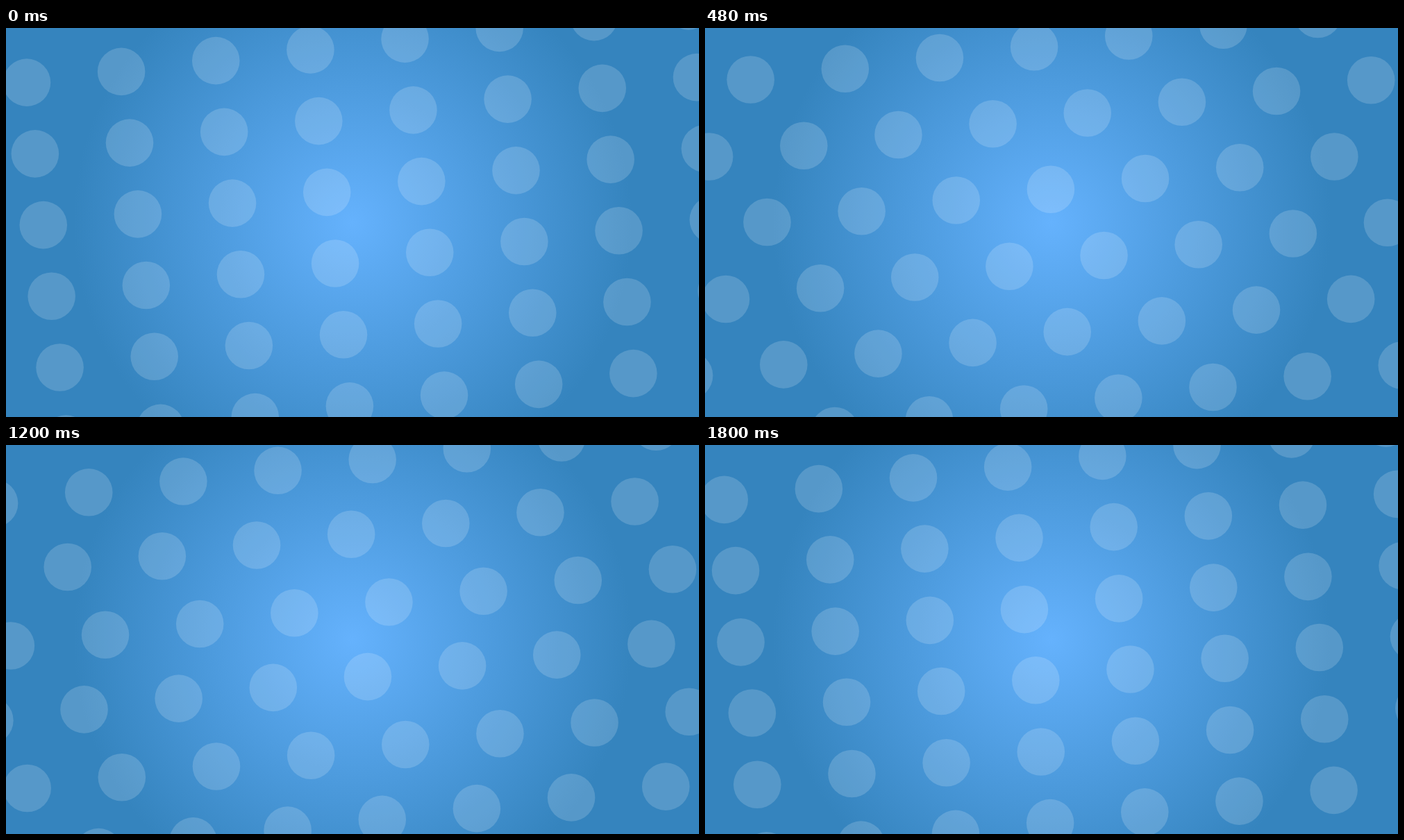
An HTML page with a canvas that plays this animation: 998 by 561 pixels, repeating every 1.83 s.

```html
<!DOCTYPE html>
<html lang="en">
<head>
<meta charset="utf-8">
<title>Drifting dots</title>
<style>
  html, body { margin: 0; width: 100%; height: 100%; overflow: hidden; }
  canvas { display: block; }
</style>
</head>
<body>
<canvas id="stage" width="998" height="561"></canvas>
<script>
const W = 998, H = 561, LOOP = 1830, TICK = 30;
const RADIUS = 34.3;
const STEP = { x: 136.15, y: -15.75 };   // from dot to dot along a row
const ROW = { x: 11.9, y: 102.72 };      // from row to row
const ORIGIN = { x: 438.4, y: 31.4 };
const ROWS = 6;
const LAST_ROW_SHIFT = -0.022;           // the last row sits slightly back

const ctx = document.getElementById('stage').getContext('2d');
const glow = ctx.createRadialGradient(W / 2, H / 2, 0, W / 2, H / 2, 402);
glow.addColorStop(0, '#65b2fd');
glow.addColorStop(1, '#3584be');

function dot(x, y) {
  ctx.beginPath();
  ctx.arc(x, y, RADIUS, 0, Math.PI * 2);
  ctx.fill();
}

function draw(time) {
  const phase = Math.floor(time % LOOP / TICK) * TICK / LOOP;
  ctx.fillStyle = glow;
  ctx.fillRect(0, 0, W, H);
  ctx.fillStyle = 'rgba(255, 255, 255, 0.165)';
  for (let row = 0; row < ROWS; row++) {
    // Neighbouring rows slide in opposite directions by one step per loop.
    let shift = row % 2 ? -phase : phase;
    if (row === ROWS - 1) shift += LAST_ROW_SHIFT;
    for (let i = -6; i <= 6; i++) {
      dot(ORIGIN.x + row * ROW.x + (i + shift) * STEP.x,
          ORIGIN.y + row * ROW.y + (i + shift) * STEP.y);
    }
  }
}

const start = performance.now();
function frame() {
  draw(performance.now() - start);
  requestAnimationFrame(frame);
}
frame();
</script>
</body>
</html>
```
